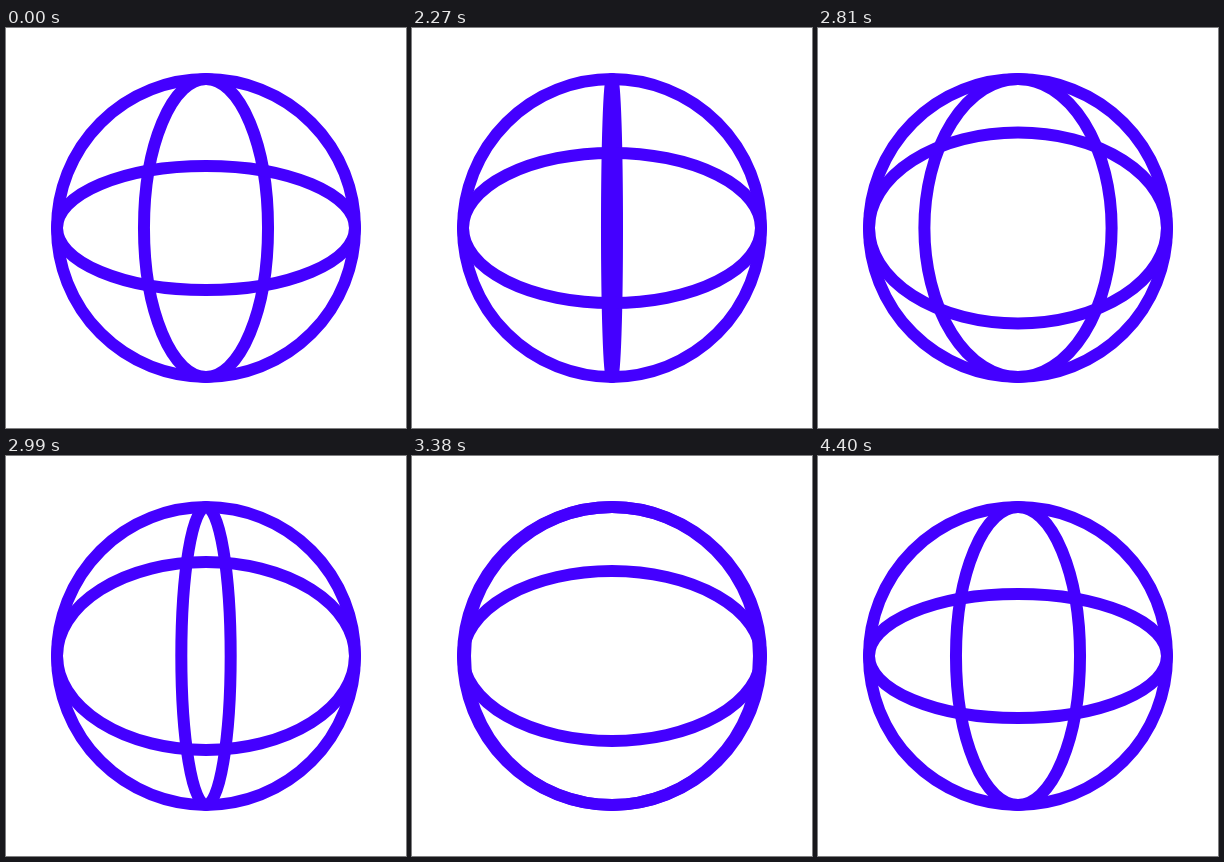
An HTML page without scripts that plays this animation: 400x400 px, repeating every 4.43 s.

```html
<!DOCTYPE html>
<html lang="en">
<head>
<meta charset="utf-8">
<title>Turning globe</title>
<style>
  @property --turn {
    syntax: "<angle>";
    inherits: false;
    initial-value: 24.6deg;
  }

  html, body {
    margin: 0;
    width: 100%;
    height: 100%;
    overflow: hidden;
    background: #fff;
  }

  svg {
    display: block;
    width: 100%;
    height: 100%;
    fill: none;
    stroke: #40f;
    stroke-width: 12px;
  }

  /* A meridian seen edge-on at 0deg and face-on at 90deg */
  .meridian {
    rx: max(149px * sin(var(--turn)), -149px * sin(var(--turn)), 0.3px);
    animation: spin 4430ms infinite;
  }

  .parallel {
    animation: tilt 4430ms infinite;
  }

  @keyframes spin {
    0% { --turn: 24.6deg; animation-timing-function: linear; }
    45.147% { --turn: 24.6deg; animation-timing-function: cubic-bezier(.333, 0, .667, .469); }
    56.659% { --turn: -54.3deg; animation-timing-function: cubic-bezier(.333, .292, .667, .727); }
    67.494% { --turn: -189.3deg; animation-timing-function: cubic-bezier(.333, .421, .667, .744); }
    76.298% { --turn: -260.4deg; animation-timing-function: cubic-bezier(.333, .447, .667, .793); }
    88.488% { --turn: -316.8deg; animation-timing-function: cubic-bezier(.333, .559, .667, 1); }
    99.323%, 100% { --turn: -335.4deg; }
  }

  @keyframes tilt {
    0% { ry: 62px; animation-timing-function: linear; }
    45.147% { ry: 62px; animation-timing-function: cubic-bezier(.333, 0, .667, .8); }
    56.659% { ry: 90px; animation-timing-function: cubic-bezier(.333, .545, .667, 1); }
    62.754% { ry: 95.5px; animation-timing-function: cubic-bezier(.333, 0, .667, .22); }
    67.494% { ry: 94px; animation-timing-function: cubic-bezier(.333, .24, .667, .47); }
    76.298% { ry: 85px; animation-timing-function: cubic-bezier(.333, .314, .667, .9); }
    88.488% { ry: 64px; animation-timing-function: cubic-bezier(.333, .933, .667, 1); }
    99.323%, 100% { ry: 62px; }
  }
</style>
</head>
<body>
<svg viewBox="0 0 400 400">
  <circle cx="200" cy="200" r="149"/>
  <ellipse class="meridian" cx="200" cy="200" rx="62" ry="149"/>
  <ellipse class="parallel" cx="200" cy="200" rx="149" ry="62"/>
</svg>
</body>
</html>
```
